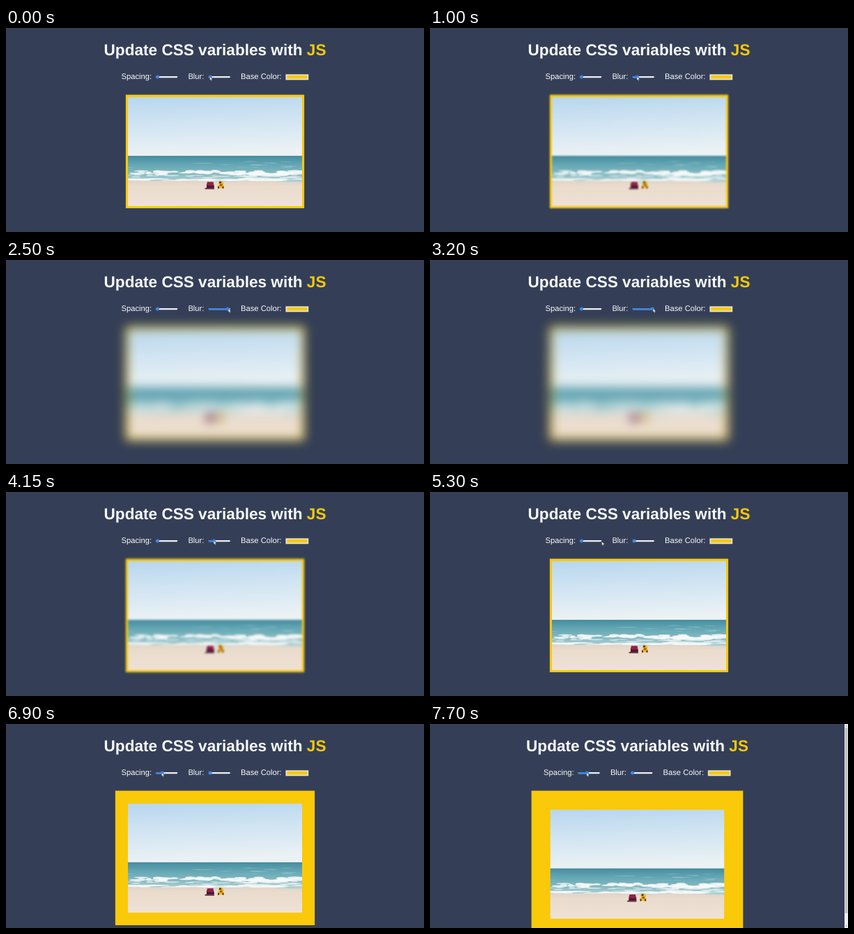
Recreate the animation shown at these times as an HTML page. Size 600 by 292 pixels, loop 8000 ms.

```html
<!DOCTYPE html>
<html lang="en">
<head>
<meta charset="utf-8">
<title>Update CSS variables with JS</title>
<style>
  html, body { margin: 0; width: 100%; height: 100%; overflow: hidden; background: #343f57; }
  svg { display: block; width: 100%; height: 100%; }
  text { font-family: "Liberation Sans", Arial, sans-serif; fill: #f8f9fb; text-rendering: geometricPrecision; }
  .title { font-size: 22.6px; font-weight: 700; }
  .label { font-size: 11.2px; }
  .base { fill: #f9c90a; }
  .accent { fill: #3a87ea; }
  .track { fill: #eff0f2; }
</style>
</head>
<body>
<svg viewBox="0 0 600 292">
  <defs>
    <linearGradient id="sky" x2="0.12" y2="1">
      <stop stop-color="#b7d6ee"/>
      <stop offset=".45" stop-color="#d0e4f2"/>
      <stop offset="1" stop-color="#ecf2f4"/>
    </linearGradient>
    <linearGradient id="sea" x2="0" y2="1">
      <stop stop-color="#468c9f"/>
      <stop offset=".3" stop-color="#62a5b3"/>
      <stop offset=".65" stop-color="#85bac2"/>
      <stop offset="1" stop-color="#bfd8da"/>
    </linearGradient>
    <linearGradient id="sand" x2="0" y2="1">
      <stop stop-color="#dfd3c7"/>
      <stop offset=".2" stop-color="#e9dccd"/>
      <stop offset="1" stop-color="#efe2d5"/>
    </linearGradient>
    <filter id="soft" filterUnits="userSpaceOnUse" x="100" y="40" width="400" height="290" color-interpolation-filters="sRGB">
      <feGaussianBlur id="gauss" stdDeviation="0"/>
    </filter>
    <clipPath id="crop"><rect width="250" height="156.25"/></clipPath>
  </defs>

  <rect width="600" height="292" fill="#343f57"/>

  <g id="page">
    <text class="title" x="300" y="39" text-anchor="middle">Update CSS variables with <tspan class="base">JS</tspan></text>
    <text class="label" x="165.6" y="72.8">Spacing:</text>
    <text class="label" x="261.4" y="72.8">Blur:</text>
    <text class="label" x="337.1" y="72.8">Base Color:</text>
    <g id="sliders"></g>
    <rect x="401.5" y="66.2" width="32.6" height="8" fill="#ececec" stroke="#8d929c" stroke-width=".5"/>
    <rect class="base" x="403" y="67.7" width="29.6" height="5"/>

    <g id="picture">
      <rect id="frame" class="base" y="95.5"/>
      <g id="photo" clip-path="url(#crop)">
        <rect width="250" height="86" fill="url(#sky)"/>
        <rect y="84.3" width="250" height="40" fill="url(#sea)"/>
        <path id="shore" fill="url(#sand)"/>
        <g id="foam" fill="#f7f9f8"></g>
        <path d="M110 131l4-2 10 1v2h-13z" fill="#4a3a42"/>
        <path d="M114 121.5h8.5l1.2 5.5-1 4h-9l-1-5z" fill="#8d2348"/>
        <path d="M113 127h10.5l.5 2.8h-11z" fill="#401a30"/>
        <path d="M130 122.5l2-2.5 3 .5 2.5 2-.5 3 1.5 3-3 2h-4.5l-2.5-2.5 2-2z" fill="#e8bd1e"/>
        <path d="M131 121h3v2.5h-3zM129 128h2v3h-2zM135.5 128h2v3h-2z" fill="#55302a"/>
        <path d="M132 124.5h3.5v3h-3.5z" fill="#b8531f"/>
      </g>
    </g>
  </g>

  <g id="bar">
    <rect x="595" width="5" height="292" fill="#f1f1f1"/>
    <rect id="grip" x="595.6" y="5.3" width="3.8" fill="#c1c1c1"/>
    <path d="M596.4 3.4l1.1-1.4 1.1 1.4zM596.4 288.6l1.1 1.4 1.1-1.4z" fill="#777"/>
  </g>

  <path id="cursor" d="M0 0V5.6L1.3 4.5 2.2 6.5 3.1 6.1 2.3 4.2H4z" fill="#fff" stroke="#1b2230" stroke-width=".45"/>
</svg>

<script>
const LOOP = 8000, SCALE = 0.3125, TOP = 95.5, WIDE = 250, TALL = 156.25;
const $ = id => document.getElementById(id);
const set = (el, attrs) => { for (const k in attrs) el.setAttribute(k, attrs[k]); };
const add = (parent, tag, attrs) => {
  const el = document.createElementNS("http://www.w3.org/2000/svg", tag);
  set(el, attrs);
  return parent.appendChild(el);
};

// [time, value] pairs
const BLUR = [[100, 0], [900, 3], [1550, 12.5], [1800, 15], [2500, 23.7], [2950, 25], [3180, 25], [4000, 6.5], [4150, 5], [4850, 0]];
const SPACING = [[5750, 10], [6250, 29], [6550, 41], [7000, 63], [7400, 86]];
const TRAVEL = [[4900, 0], [5600, 1]];

function at(keys, t) {
  if (t <= keys[0][0]) return keys[0][1];
  for (let i = 1; i < keys.length; i++) {
    const [t0, a] = keys[i - 1], [t1, b] = keys[i];
    if (t < t1) return a + (b - a) * (t - t0) / (t1 - t0);
  }
  return keys[keys.length - 1][1];
}

function slider(x) {
  const box = $("sliders");
  add(box, "rect", { class: "track", x, y: 68.9, width: 31.2, height: 2.3, rx: 1.1 });
  const fill = add(box, "rect", { class: "accent", x, y: 68.9, height: 2.3, rx: 1.1 });
  const thumb = add(box, "circle", { class: "accent", cy: 70, r: 2.5 });
  return part => {
    const cx = x + 2.5 + part * 26.2;
    set(fill, { width: cx - x });
    set(thumb, { cx });
    return cx;
  };
}
const moveSpacing = slider(215), moveBlur = slider(290.7);

function drawShore() {
  let d = "M0 160";
  for (let x = 0; x <= 250; x += 5) d += `L${x} ${119 + x / 110 + Math.sin(x / 17) * 0.9}`;
  set($("shore"), { d: d + "V160Z" });

  let seed = 7;
  const rnd = () => (seed = seed * 16807 % 2147483647) / 2147483647;
  const streaks = (n, y, spread, len, thick, opacity) => {
    for (let i = 0; i < n; i++) {
      add($("foam"), "ellipse", {
        cx: rnd() * 250, cy: y + (rnd() - 0.5) * spread,
        rx: len * (0.4 + rnd()), ry: thick * (0.5 + rnd()), opacity
      });
    }
  };
  streaks(14, 97, 10, 12, 0.3, 0.35);
  streaks(60, 108.5, 5, 10, 1.3, 0.85);
  streaks(35, 114, 5, 11, 0.8, 0.6);
  streaks(45, 118.5, 3, 12, 0.8, 0.85);
}

function draw(t) {
  const blur = Math.round(at(BLUR, t));
  const spacing = Math.round(at(SPACING, t));
  const pad = spacing * SCALE;
  const pageHeight = TOP + TALL + 2 * pad + 4;
  const scrolls = pageHeight > 292;
  const shift = scrolls ? -2.5 : 0;

  set($("page"), { transform: `translate(${shift} 0)` });
  set($("frame"), { x: 175 - pad, width: WIDE + 2 * pad, height: TALL + 2 * pad });
  set($("photo"), { transform: `translate(175 ${TOP + pad})` });
  set($("gauss"), { stdDeviation: blur * SCALE });
  set($("picture"), { filter: blur ? "url(#soft)" : "none" });

  set($("bar"), { visibility: scrolls ? "visible" : "hidden" });
  set($("grip"), { height: 281.4 * Math.min(1, 292 / pageHeight) });

  const sx = moveSpacing((spacing - 10) / 190), bx = moveBlur(blur / 25);
  const k = at(TRAVEL, t), ease = k * k * (3 - 2 * k);
  const x = bx + (sx - bx) * ease - 0.6 + blur * 0.06 + shift;
  const y = 69.4 + Math.sin(Math.PI * ease) * 1.5;
  set($("cursor"), { transform: `translate(${x} ${y})` });
}

drawShore();
const start = performance.now();
function tick() {
  draw((performance.now() - start) % LOOP);
  requestAnimationFrame(tick);
}
tick();
</script>
</body>
</html>
```
